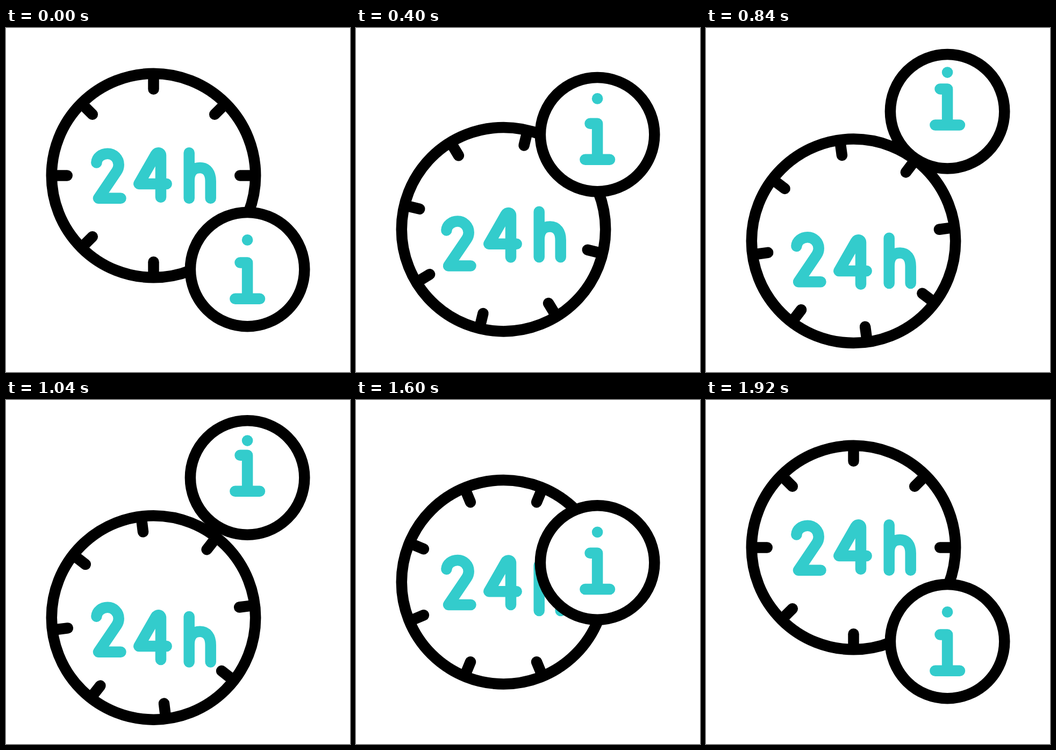
Write an HTML page that moves like this. It is 640 px wide and 640 px high and loops after 2 s.

```html
<!DOCTYPE html>
<html lang="en">
<head>
<meta charset="utf-8">
<title>24h info</title>
<style>
  html, body { margin: 0; width: 100%; height: 100%; overflow: hidden; background: #fff; }
  svg { display: block; width: 100%; height: 100%; }
  .ink { stroke: #000; fill: none; }
  .hue { stroke: #33cccc; fill: none; }
  svg { stroke-width: 20.5; stroke-linecap: round; stroke-linejoin: round; }
</style>
</head>
<body>
<svg viewBox="0 0 640 640">
  <g id="clock">
    <circle class="ink" cx="274.5" cy="274.5" r="189.7"/>
    <g id="ticks" class="ink"></g>
  </g>
  <path id="two" class="hue" d="M168.4 250.5C169 241 178 233.7 189 233.7C200.5 233.7 209.7 243 209.7 254.5C209.7 259 208.3 263 206 266.6L172 316.7H213.5"/>
  <path id="four" class="hue" d="M288 314.7V237C288 231.6 281.4 230.3 278.6 235.3L247.3 289.9H298.7"/>
  <path id="hour" class="hue" d="M340.7 232.3V316.7V284C340.7 266 350 260 361 260C374 260 380.7 270 380.7 285V316.7"/>
  <circle id="badge" cx="449.1" cy="449.1" r="106.2" fill="#fff" stroke="#000"/>
  <circle id="dot" cx="449.1" cy="394.4" r="10.3" fill="#33cccc"/>
  <path id="stem" class="hue" d="M435.5 436.6H449.1V503.8M426.4 503.8H472"/>
</svg>
<script>
  const LOOP = 2000, STEP = 40, LAST = 1920, C = 274.5;
  const el = id => document.getElementById(id);

  // Tracks are [time, value] pairs, eased in and out between neighbours.
  const clockY = [[0, 0], [506, 113], [1320, 137], [1350, 137], [1830, 0]];
  const badgeY = [[0, 0], [506, -283], [1320, -312.7], [1350, -312.7], [1830, 0]];
  const spin = [[0, 0], [540, -145.6], [980, -141.8], [1350, -144], [1830, 0]];
  const lag = (start, peak, end, size) => [[start, 0], [peak, size], [end, 0]];
  const parts = [
    ["two", clockY, lag(165, 570, 1540, 41.5)],
    ["four", clockY, lag(130, 900, 1710, 41)],
    ["hour", clockY, lag(125, 1010, 1910, 40.5)],
    ["badge", badgeY, [[0, 0]]],
    ["dot", badgeY, lag(115, 610, 1850, -19.7)],
    ["stem", badgeY, lag(130, 935, 1840, -30.5)]
  ].map(([id, base, extra]) => ({ node: el(id), base, extra }));

  function valueAt(track, t) {
    if (t <= track[0][0]) return track[0][1];
    for (let i = 1; i < track.length; i++) {
      const [t0, a] = track[i - 1], [t1, b] = track[i];
      if (t < t1) {
        const p = (t - t0) / (t1 - t0);
        return a + (b - a) * p * p * (3 - 2 * p);
      }
    }
    return track[track.length - 1][1];
  }

  for (let i = 0; i < 8; i++) {
    const tick = document.createElementNS("http://www.w3.org/2000/svg", "path");
    tick.setAttribute("d", `M${C} ${C - 186}V${C - 160.8}`);
    tick.setAttribute("transform", `rotate(${i * 45} ${C} ${C})`);
    el("ticks").append(tick);
  }

  function draw(t) {
    el("clock").setAttribute("transform", `translate(0 ${valueAt(clockY, t)})`);
    el("ticks").setAttribute("transform", `rotate(${valueAt(spin, t)} ${C} ${C})`);
    for (const { node, base, extra } of parts) {
      node.setAttribute("transform", `translate(0 ${valueAt(base, t) + valueAt(extra, t)})`);
    }
  }

  const begin = performance.now();
  function tick() {
    const t = (performance.now() - begin) % LOOP;
    draw(Math.min(LAST, Math.floor(t / STEP) * STEP));
    requestAnimationFrame(tick);
  }
  tick();
</script>
</body>
</html>
```
